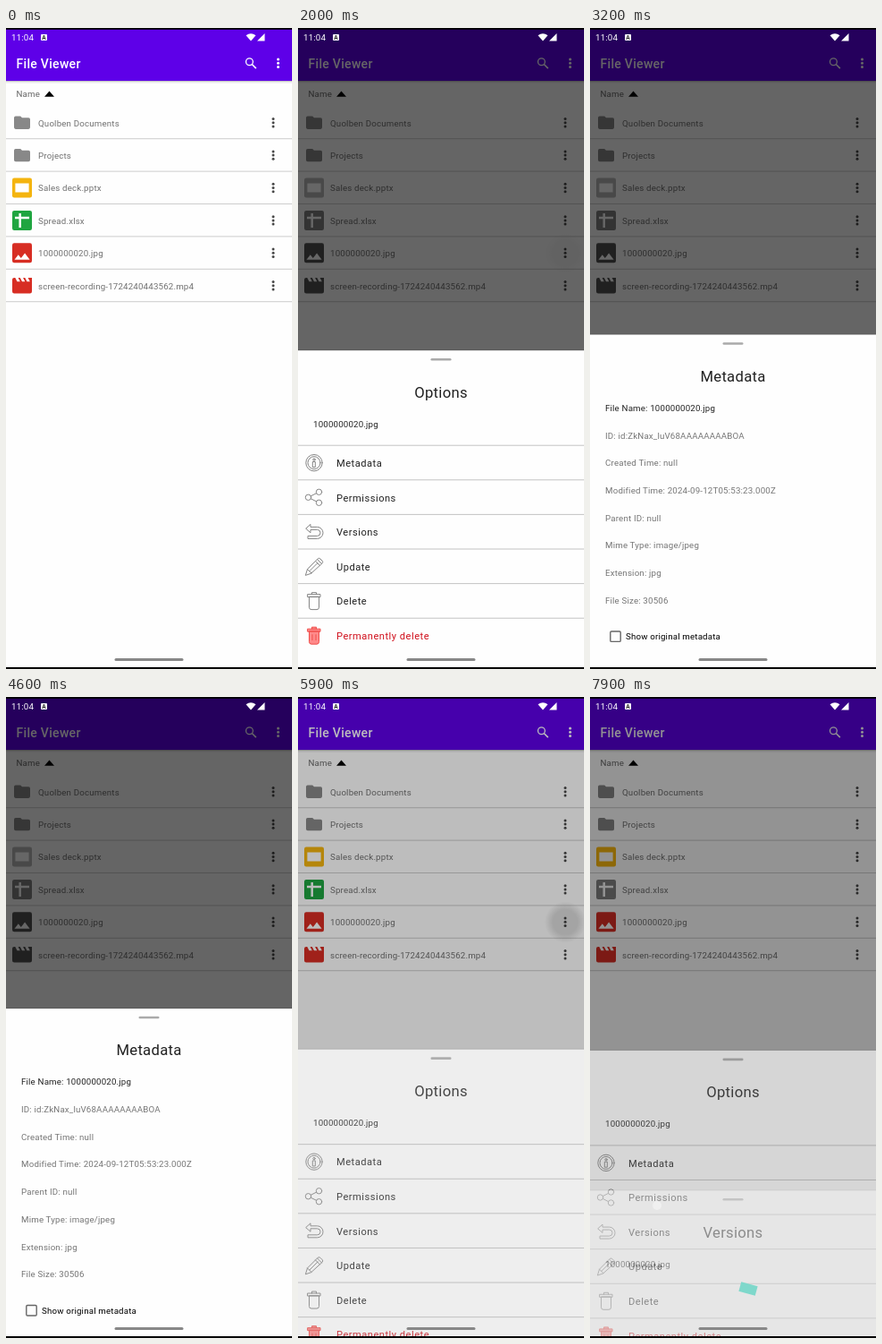
Recreate the animation shown at these times as an HTML page. Size 320 px wide and 716 px high, loop 8000 ms.

```html
<!DOCTYPE html>
<html lang="en">
<head>
<meta charset="utf-8">
<title>File Viewer</title>
<style>
  html, body { margin: 0; height: 100%; overflow: hidden; background: #000; }
  svg { display: block; width: 100vw; height: 100vh; font: 9.72px Roboto, sans-serif; letter-spacing: .174px; }
  .title { font-size: 16.67px; letter-spacing: .28px; text-anchor: middle; fill: #212121; }
  .item { font-size: 11.1px; letter-spacing: .5px; fill: #212121; }
  .line { fill: none; stroke: #858585; stroke-width: 1; stroke-linejoin: round; stroke-linecap: round; }
</style>
</head>
<body>
<svg id="stage" viewBox="0 0 320 716"></svg>
<script>
const text = (x, y, s, attrs = 'fill="#707070"') => `<text x="${x}" y="${y}" ${attrs}>${s}</text>`;
const rect = (x, y, w, h, fill, attrs = '') =>
  `<rect x="${x}" y="${y}" width="${w}" height="${h}" fill="${fill}" ${attrs}/>`;
const path = (d, attrs = '') => `<path d="${d}" ${attrs}/>`;
const at = (x, y, body, scale = 1) => `<g transform="translate(${x} ${y}) scale(${scale})">${body}</g>`;
const dots = (x, y, fill) =>
  [-4.2, 0, 4.2].map(d => `<circle cx="${x}" cy="${y + d}" r="1.5" fill="${fill}"/>`).join('');
const tile = fill => rect(-11, -11, 22, 22, fill, 'rx="2.2"');

// File icons, centred on 0,0
const folder = at(-10.8, -10.8,
  path('M10 4H4a2 2 0 0 0-2 2v12a2 2 0 0 0 2 2h16a2 2 0 0 0 2-2V8a2 2 0 0 0-2-2h-8z', 'fill="#888"'), .9);
const slides = tile('#f4b40f') + rect(-7.6, -5, 15.2, 10, '#fff');
const sheet = tile('#1fa540') + path('M-2.3-8V8M-8-3H8', 'stroke="#fff" stroke-width="2.5"');
const image = tile('#d72d23') +
  at(-14.6, -14.4, path('M8.5 13.5l2.5 3 3.5-4.5 4.5 6H5z', 'fill="#fff"'), 1.22);
const movie = at(-13.2, -13.2, path('M18 4l2 4h-3l-2-4h-2l2 4h-3l-2-4H8l2 4H7L5 4H4a2 2 0 0 0-2 2v12' +
  'a2 2 0 0 0 2 2h16a2 2 0 0 0 2-2V4z', 'fill="#d72d23"'), 1.1);

const files = [
  ['Quolben Documents', folder], ['Projects', folder], ['Sales deck.pptx', slides],
  ['Spread.xlsx', sheet, 'green'], ['1000000020.jpg', image], ['screen-recording-1724240443562.mp4', movie]
];
const fileRow = ([name, icon, id], i) => {
  const y = 106 + 36.4 * i;
  return `<g ${id ? `id="${id}"` : ''}>${at(18, y - .3, icon)}</g>` + text(36, y + 3.5, name) +
    dots(299, y - .3, '#484848') + rect(0, y + 17.2, 320, 1, '#cdcdcd');
};

// Menu icons, centred on 0,0
const bin = 'M-5.5-4.5V7q0 2.5 2.5 2.5h6q2.5 0 2.5-2.5V-4.5zM-7-7.5H7v3H-7zM-2.5-7.5v-2h5v2';
const options = [
  ['Metadata', '<circle r="9.2"/><circle r="7"/><circle cy="-3.6" r="1.2"/>' + path('M-1.3-1.2H1.3V4.8H-1.3z')],
  ['Permissions', '<circle cx="-6.5" r="3.2"/><circle cx="5.5" cy="-6" r="3.2"/><circle cx="5.5" cy="6" r="3.2"/>' +
    path('M-3.6-1.5L2.6-4.6M-3.6 1.5L2.6 4.6')],
  ['Versions', path('M-9-4L-4-8.5V-5.5H3.5a6.5 6.5 0 0 1 0 13H-7V4.5H3.5a3.5 3.5 0 0 0 0-7H-4V.5z')],
  ['Update', path('M-9.5 9.5L-7.5 3 4-8.5q1.5-1.5 3 0L9-6.5q1.5 1.5 0 3L-3 7.5z' +
    'M-7.5 3L-3 7.5M1.5-6L6.5-1M3.5-8L8.5-3M-5 5L4-4')],
  ['Delete', path(bin)],
  ['Permanently delete', path(bin + 'M-2-1V5M2-1V5', 'fill="#ff8a8a" stroke="#f0504d"')]
];
const optionRow = ([name, icon], i) => {
  const y = 485.7 + 38.6 * i;
  return rect(0, y - 20, 320, 1, '#c4c4c4') + `<g class="line">${at(18, y, icon)}</g>` +
    text(43, y + 4.2, name, `class="item" ${i == 5 ? 'style="fill:#d0101c"' : ''}`);
};

const details = ['File Name: 1000000020.jpg', 'ID: id:ZkNax_luV68AAAAAAAABOA', 'Created Time: null',
  'Modified Time: 2024-09-12T05:53:23.000Z', 'Parent ID: null', 'Mime Type: image/jpeg',
  'Extension: jpg', 'File Size: 30506'];

const panel = (id, top, title, body) => `<g id="${id}">` +
  rect(0, top - 1, 320, 400, '#000', 'opacity=".1"') + rect(0, top, 320, 400, '#fefefe') +
  rect(148.5, top + 8.7, 23, 2.6, '#aaa', 'rx="1.3"') + text(160, top + 52.4, title, 'class="title"') + body + '</g>';
const fileName = top => text(17, top + 85.3, '1000000020.jpg', 'fill="#222"');
const shade = id => rect(0, 0, 320, 716, '#000', `id="${id}"`);

stage.innerHTML =
  '<radialGradient id="soft"><stop offset=".6"/><stop offset="1" stop-opacity="0"/></radialGradient>' +
  rect(0, 0, 320, 716, '#fefefe') +
  rect(0, 59, 320, 1, '#000', 'opacity=".22"') + rect(0, 60, 320, 1.5, '#000', 'opacity=".07"') +
  rect(0, 0, 320, 59, '#5e00e8') +
  text(11.5, 44.8, 'File Viewer', 'fill="#fff" style="font-size:14px;font-weight:500;letter-spacing:.3px"') +
  '<circle cx="272.4" cy="37.7" r="3.9" fill="none" stroke="#fff" stroke-width="1.3"/>' +
  path('M275.2 40.5l4.6 4.6', 'stroke="#fff" stroke-width="1.6"') + dots(304.5, 39.3, '#fff') +
  text(11.5, 77, 'Name', 'fill="#666"') + path('M43 76.8L48.5 70.5 54 76.8z', 'fill="#000"') +
  `<g id="list">${files.map(fileRow).join('')}</g>` +
  '<circle id="ripple" cx="299" cy="251.5" fill="url(#soft)"/>' +
  shade('lowDim') +
  panel('menu', 360.2, 'Options', fileName(360.2) + options.map(optionRow).join('') +
    rect(0, 0, 320, 38, '#000', 'id="press"')) +
  shade('highDim') +
  panel('meta', 342.5, 'Metadata', details.map((s, i) =>
      text(17, 427.8 + 30.7 * i, s, `fill="${i ? '#757575' : '#222'}"`)).join('') +
    rect(22.8, 674, 11.4, 11.4, 'none', 'rx="1.2" stroke="#666" stroke-width="1.4"') +
    text(40, 683.3, 'Show original metadata', 'fill="#000"')) +
  panel('versions', 470.5, 'Versions', fileName(470.5)) +
  '<g id="loader"><circle cx="75" cy="568" r="5" fill="#fff" opacity=".4"/>' +
    rect(-9.5, -5.5, 19, 11, '#7fd8cb', 'transform="translate(177 661) rotate(15)"') + '</g>' +
  text(6, 14, '11:04', 'fill="#fff"') +
  rect(39, 7, 7, 7, '#fff', 'rx="1"') +
  text(42.6, 12.9, 'A', 'fill="#222" style="font-size:6.5px;font-weight:700;text-anchor:middle"') +
  path('M268.5 8.2q5.5-4 11 0L274 14.5zM281 14.5h8.5V6z', 'fill="#fff"') +
  rect(121.5, 704, 77, 3, '#888', 'id="home" rx="1.5"') +
  rect(0, 0, 320, 1.8, '#000') + rect(0, 714, 320, 2, '#000');

const el = id => document.getElementById(id);
const ramp = (t, start, length) => Math.min(1, Math.max(0, (t - start) / length));
const SLIDE = 136, DIM = .6;
const easeOut = p => 1 - (1 - p) ** 2;

function place(id, shown, y = SLIDE * (1 - shown)) {
  el(id).setAttribute('opacity', shown);
  el(id).setAttribute('transform', `translate(0 ${y})`);
}

function draw(t) {
  const second = t >= 5500;
  const tap = second ? 5500 : 1200, swap = second ? 7700 : 2500;

  const enter = easeOut(ramp(t, tap + 280, 240));
  const leave = ramp(t, swap + 100, 200) ** 2;
  place('menu', enter * (1 - leave), SLIDE * (1 - enter + leave));

  const next = easeOut(ramp(t, swap + 146, 240));
  const drag = ramp(t, 4570, 430);
  place('meta', second || drag == 1 ? 0 : next, SLIDE * (1 - next) + 375 * drag * drag * (3 - 2 * drag));
  place('versions', second ? next : 0);
  el('loader').setAttribute('opacity', second && next > 0 ? 1 : 0);

  const low = DIM * ramp(t, tap + 280, 280) * (1 - ramp(t, swap + 100, 280));
  const high = DIM * ramp(t, swap + 170, 280) * (second ? 1 : 1 - ramp(t, 4960, 440));
  el('lowDim').setAttribute('opacity', low);
  el('highDim').setAttribute('opacity', high);

  // Icons lose their colour as the page darkens
  const dim = 1 - (1 - low) * (1 - high);
  el('list').style.filter = dim > .5 ? 'grayscale(1)' : '';
  el('green').style.filter = dim > .35 ? 'grayscale(1)' : '';
  el('home').setAttribute('fill', drag == 1 && dim > .1 && !second ? '#b8b8b8' : '#888');

  el('ripple').setAttribute('r', 11 + 12 * easeOut(ramp(t, tap, 250)));
  el('ripple').setAttribute('opacity', t < tap ? 0 : .13 * (1 - ramp(t, tap + 500, 400)));
  el('press').setAttribute('y', second ? 543.5 : 466.5);
  el('press').setAttribute('opacity', t < swap ? 0 : .07 * (1 - ramp(t, swap + 50, 150)));
}

function loop(now) {
  draw(now % 8000);
  requestAnimationFrame(loop);
}
draw(0);
requestAnimationFrame(loop);
</script>
</body>
</html>
```
